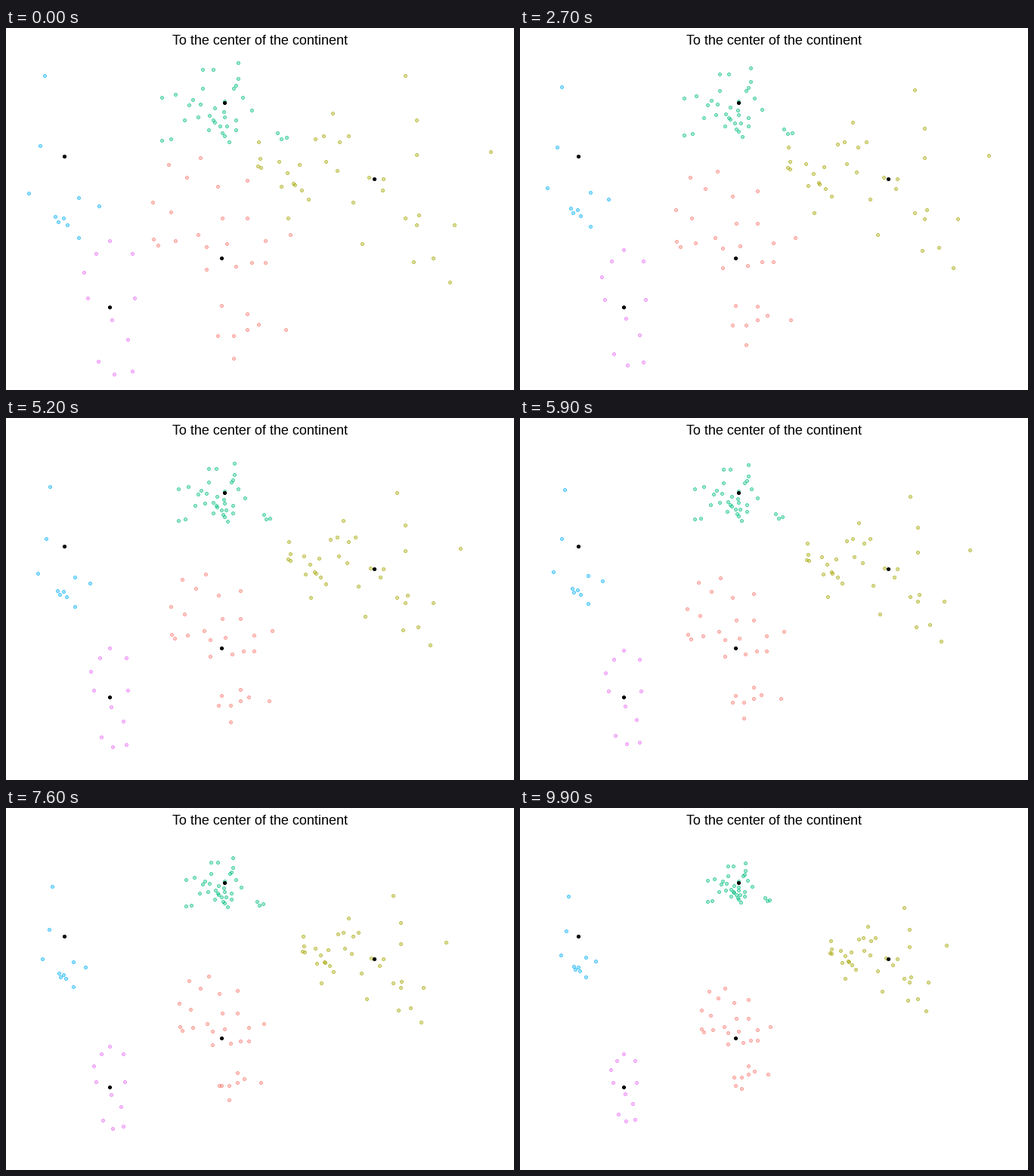
A matplotlib script that plays this animation: 672 px wide and 480 px high, repeating every 10000 ms.

```python
import numpy as np
import matplotlib.pyplot as plt
from matplotlib.animation import FuncAnimation
from matplotlib.collections import PolyCollection

W, H, DPI = 672, 480, 96
FRAMES, INTERVAL = 100, 100
ALPHA = 0.4

# Dot outline: a 5 px square without its corners, and the same with a 3 px hole
BODY = np.array([(1, 0), (4, 0), (4, 1), (5, 1), (5, 4), (4, 4),
                 (4, 5), (1, 5), (1, 4), (0, 4), (0, 1), (1, 1)]) - 2
HOLE = np.array([(1, 1), (1, 4), (4, 4), (4, 1), (1, 1)]) - 2
RIM = np.vstack([BODY, BODY[:1], HOLE, BODY[:1]])

fig = plt.figure(figsize=(W / DPI, H / DPI), dpi=DPI, facecolor="white")
ax = fig.add_axes([0, 0, 1, 1])
ax.set(xlim=(0, W), ylim=(H, 0))
ax.axis("off")
ax.text(W / 2, 22, "To the center of the continent", ha="center",
        va="baseline", family="Liberation Sans", fontsize=13.5, color="black")

groups = []


def add_dots(color, alpha, zorder):
    dots = PolyCollection([], facecolor=color, alpha=alpha, linewidth=0,
                          edgecolor="none", antialiased=False, zorder=zorder)
    return ax.add_collection(dots, autolim=False)


def add_group(color, center, points, fixed=()):
    """Dots that drift toward the center, plus dots that stay put."""
    start = np.array(points + list(fixed), float)
    goal = np.tile(np.array(center, float), (len(start), 1))
    goal[len(points):] = start[len(points):]
    groups.append((add_dots(color, ALPHA, 2), start, goal))
    add_dots("black", 1, 3).set_verts([BODY + center])


# Africa
add_group("#F8766D", (285, 305), [
    (257, 172), (215, 181), (239, 198), (280, 210), (319, 202), (194, 231),
    (218, 244), (286, 252), (319, 252), (254, 274), (195, 280), (201, 288),
    (224, 282), (265, 290), (292, 286), (343, 282), (376, 274), (265, 320),
    (304, 316), (325, 311), (343, 311), (319, 379), (334, 393), (319, 400),
    (370, 400), (280, 408), (301, 408), (301, 438)], fixed=[(285, 368)])

# Asia
add_group("#A3A500", (487, 200), [
    (528, 63), (432, 113), (543, 122), (641, 164), (543, 168), (334, 151),
    (420, 143), (409, 147), (441, 151), (453, 143), (336, 173), (333, 183),
    (337, 185), (361, 177), (372, 192), (388, 181), (423, 177), (438, 189),
    (364, 210), (380, 206), (382, 208), (391, 215), (400, 227), (373, 252),
    (480, 198), (498, 215), (459, 231), (471, 286), (528, 252), (543, 261),
    (546, 248), (593, 261), (539, 310), (565, 305), (587, 337)],
    fixed=[(499, 200)])

# Europe
add_group("#00BF7D", (289, 99), [
    (307, 46), (260, 55), (274, 55), (307, 67), (304, 76), (301, 80),
    (260, 80), (224, 88), (206, 92), (313, 92), (247, 95), (242, 102),
    (257, 101), (276, 106), (325, 109), (288, 111), (269, 116), (254, 118),
    (289, 118), (274, 122), (236, 122), (276, 125), (304, 122), (283, 130),
    (292, 130), (268, 135), (304, 135), (286, 139), (289, 143), (295, 151),
    (218, 147), (206, 149), (359, 139), (364, 147), (371, 145)],
    fixed=[(289, 97)])

# North America
add_group("#00B0F6", (77, 170), [
    (51, 63), (45, 156), (30, 219), (65, 250), (69, 257), (76, 252),
    (81, 261), (96, 225), (123, 236), (96, 278)])

# South America
add_group("#E76BF3", (137, 370), [
    (137, 282), (119, 299), (167, 299), (103, 324), (108, 358), (170, 358),
    (140, 387), (161, 413), (122, 442), (143, 459), (167, 455)])


def update(i):
    part = 0.5 * i / (FRAMES - 1)
    for dots, start, goal in groups:
        pos = np.floor(start + (goal - start) * part + 0.5)
        dots.set_verts([p + shape for p in pos for shape in (BODY, RIM)])
    return [g[0] for g in groups]


anim = FuncAnimation(fig, update, frames=FRAMES, interval=INTERVAL,
                     repeat=True, repeat_delay=0, blit=False)
plt.show()
```
